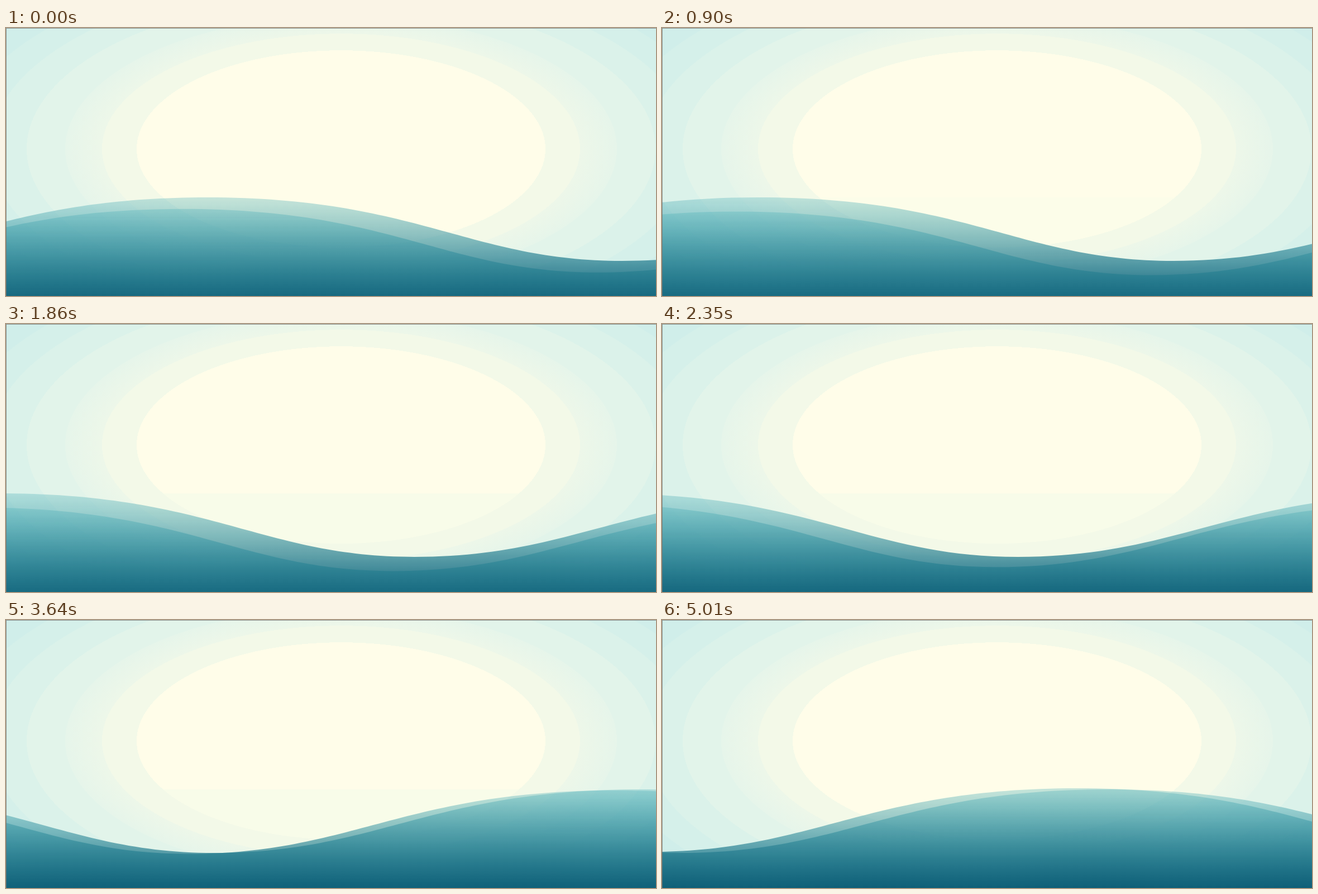
Animation, 1164 px wide and 481 px high, one loop 5110 ms. Source, as an HTML page with a canvas:

```html
<!DOCTYPE html>
<html lang="en">
<head>
<meta charset="utf-8">
<title>Ocean waves</title>
<style>
  html, body { margin: 0; width: 100%; height: 100%; overflow: hidden; }
  body {
    background: radial-gradient(ellipse 750px 362.3px at 600px 217px,
      #fffde9 366px, #f3f9e8 366px 428px, #edf7e9 428px, #e6f5ea 494px,
      #e2f4ea 494px 563px, #dbf2ea 563px 629px, #d5f0ea 629px 690px, #d0eeea 690px);
  }
  canvas { display: block; }
</style>
</head>
<body>
<canvas id="sea" width="1164" height="481"></canvas>
<script>
const W = 1164, H = 481, LOOP = 5110;
const PERIOD = 6750;              // one full pass of a wave
const S = 0.942, LEN = 1600 * S;  // wave scale and wavelength
const CREST = 304;
const ctx = document.getElementById('sea').getContext('2d');

// Step times: mostly 120 ms apart, with a few longer holds
const holds = { 5: 150, 6: 150, 18: 130, 19: 150, 22: 150, 26: 150, 32: 140, 39: 150 };
const steps = [0];
for (let i = 0; i < 40; i++) steps.push(steps[i] + (holds[i] || 120));

function bezier(x1, y1, x2, y2) {
  const at = (s, a, b) => 3 * a * s * (1 - s) ** 2 + 3 * b * s * s * (1 - s) + s ** 3;
  return x => {
    let lo = 0, hi = 1;
    for (let i = 0; i < 30; i++) {
      const mid = (lo + hi) / 2;
      if (at(mid, x1, x2) < x) lo = mid; else hi = mid;
    }
    return at(lo, y1, y2);
  };
}
const drift = bezier(0.36, 0.45, 0.63, 0.53);
const ease = bezier(0.25, 0.1, 0.25, 1);

function travel(u) {
  const turns = Math.floor(u);
  return (turns + drift(u - turns)) * LEN;
}

// Vertical offset of the front wave: up, down, up again
function swell(t) {
  const u = (t / PERIOD + 0.25) % 1 * 2;
  const k = u < 1 ? ease(u) : 1 - ease(u - 1);
  return (-2 + 30 * k) * S;
}

function wave(x, y) {
  x = ((x - 811 * S) % LEN) - LEN;
  ctx.save();
  ctx.translate(x, y);
  ctx.scale(S, S);
  const g = ctx.createLinearGradient(0, -21.7, 0, 198);
  g.addColorStop(0, 'rgba(87,187,193,.25)');
  g.addColorStop(1, 'rgb(12,92,117)');
  ctx.fillStyle = g;
  ctx.beginPath();
  ctx.moveTo(0, 121);
  for (let i = 0; i < 4; i++) {
    const o = i * 1600;
    ctx.bezierCurveTo(o + 311, 121, o + 410, 0, o + 811, 0);
    ctx.bezierCurveTo(o + 1211, 0, o + 1311, 121, o + 1600, 121);
  }
  ctx.lineTo(6400, 240);
  ctx.lineTo(0, 240);
  ctx.fill();
  ctx.restore();
}

// Slight tint of the glow below the crest line
function tint(t) {
  const a = t < 1860 ? t / 1860 : t < 3900 ? 1 : Math.max(0, 1 - (t - 3900) / 1200);
  ctx.save();
  ctx.beginPath();
  ctx.rect(0, CREST, W, H - CREST);
  ctx.clip();
  ctx.globalAlpha = a;
  ctx.fillStyle = '#f8fce9';
  ctx.beginPath();
  ctx.ellipse(600, 217, 366, 177, 0, 0, 2 * Math.PI);
  ctx.fill();
  ctx.restore();
}

function draw(t) {
  const u = 0.222 + t / PERIOD, start = travel(0.222);
  ctx.clearRect(0, 0, W, H);
  tint(t);
  wave(360 + start - travel(u), CREST);
  wave(360 + start - travel(u + 0.03), CREST + swell(t));
  ctx.fillStyle = 'rgba(110,110,110,.75)';
  ctx.fillRect(0, 0, W, 1);
  ctx.fillRect(0, 1, 1, H);
}

const begin = performance.now();
function tick() {
  const t = (performance.now() - begin) % LOOP;
  draw(steps.filter(s => s <= t).pop());
  requestAnimationFrame(tick);
}
tick();
</script>
</body>
</html>
```
